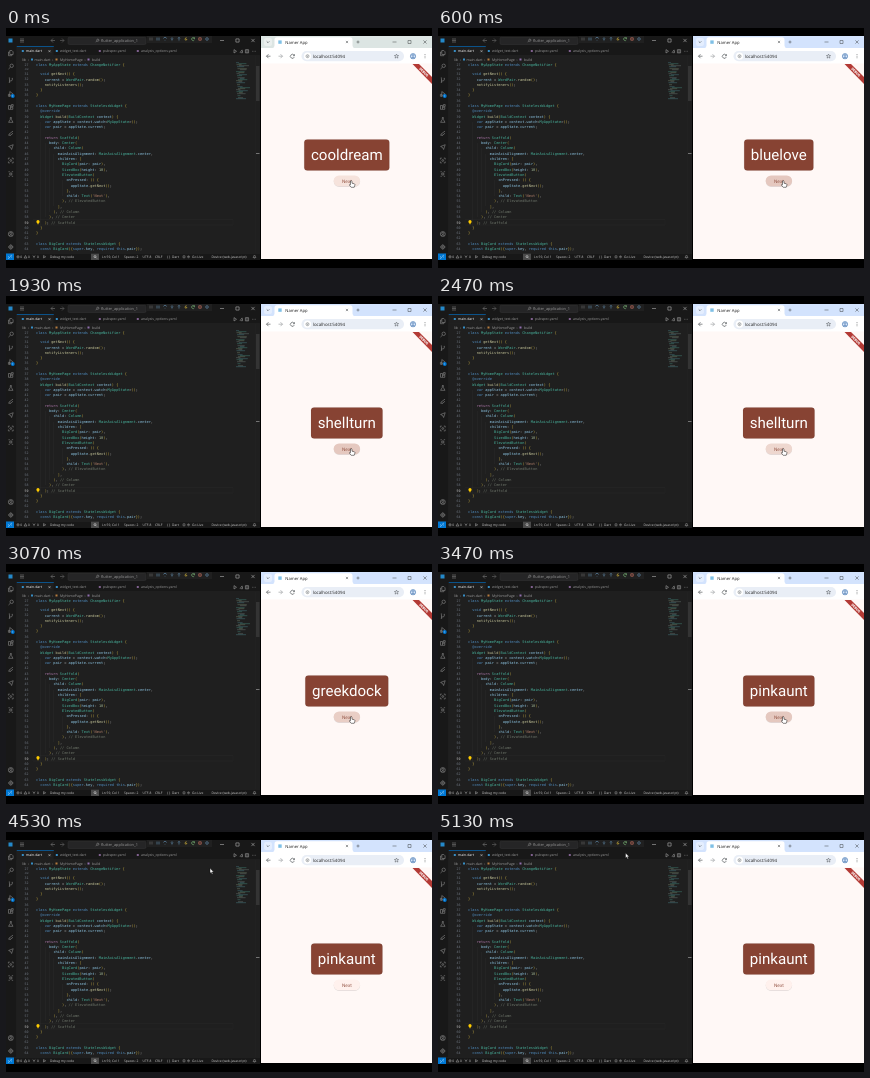
An HTML page that plays this animation: 426x240 px, repeating every 5.19 s.

```html
<!DOCTYPE html>
<html lang="en">
<head>
<meta charset="utf-8">
<title>Namer App demo</title>
<style>
html, body { margin: 0; width: 100%; height: 100%; overflow: hidden; background: #000; }
svg { display: block; width: 100vw; height: 100vh; }
text { white-space: pre; text-rendering: geometricPrecision; font-family: "Open Sans", sans-serif; }
.code { font-family: "DejaVu Sans Mono", monospace; }
.app { font-family: Roboto, sans-serif; }
</style>
</head>
<body>
<svg id="stage" viewBox="0 0 426 240"></svg>
<script>
const stage = document.getElementById('stage');
const esc = s => s.replace(/&/g, '&amp;').replace(/</g, '&lt;');
const rect = (x, y, w, h, fill, more = '') =>
  `<rect x="${x}" y="${y}" width="${w}" height="${h}" fill="${fill}" ${more}/>`;
// y is the vertical middle of the text
const label = (x, y, s, size, fill, more = '') =>
  `<text x="${x}" y="${y + size * 0.35}" font-size="${size}" fill="${fill}" ${more}>${esc(s)}</text>`;
const icon = (x, y, d, color, width = 0.6) =>
  `<path transform="translate(${x} ${y})" d="${d}" fill="none" stroke="${color}" stroke-width="${width}"/>`;
const ring = r => `M${-r} 0a${r} ${r} 0 1 0 ${2 * r} 0a${r} ${r} 0 1 0 ${-2 * r} 0`;
const box = r => `M${-r} ${-r}h${2 * r}v${2 * r}h${-2 * r}z`;
const cross = r => `M${-r} ${-r}L${r} ${r}M${r} ${-r}L${-r} ${r}`;
const back = 'M2 0H-2M0 -2L-2 0L0 2', forward = 'M-2 0H2M0 -2L2 0L0 2', dash = 'M-2 0H2';

const source = `  void getNext() {
    current = WordPair.random();
    notifyListeners();
  }
}

class MyHomePage extends StatelessWidget {
  @override
  Widget build(BuildContext context) {
    var appState = context.watch<MyAppState>();
    var pair = appState.current;

    return Scaffold(
      body: Center(
        child: Column(
          mainAxisAlignment: MainAxisAlignment.center,
          children: [
            BigCard(pair: pair),
            SizedBox(height: 10),
            ElevatedButton(
              onPressed: () {
                appState.getNext();
              },
              child: Text('Next'),
            ), // ElevatedButton
          ],
        ), // Column
      ), // Center
    ); // Scaffold
  }
}

class BigCard extends StatelessWidget {
  const BigCard({super.key, required this.pair});`.split('\n');

const rules = [
  [/^\/\/.*/, '#7c8578'], [/^'[^']*'/, '#ce9178'], [/^return\b/, '#c586c0'],
  [/^(class|extends|void|var|const|super|required|this|@override)(?!\w)/, '#569cd6'],
  [/^[A-Z]\w*/, '#4ec9b0'], [/^[a-z]\w*(?=\()/, '#dcdcaa'], [/^[a-z]\w*/, '#9cdcfe'],
  [/^\d+/, '#b5cea8'], [/^[()\[\]{}]/, '#d7ba45'], [/^[^\w]/, '#cccccc']
];

function codeLine(y, number, text) {
  let spans = '';
  for (let rest = text; rest;) {
    const [rule, color] = rules.find(([r]) => r.test(rest));
    const token = rest.match(rule)[0];
    spans += `<tspan fill="${color}">${esc(token)}</tspan>`;
    rest = rest.slice(token.length);
  }
  return label(22.5, y, String(number), 3.3, number === 59 ? '#ccc' : '#6e7681', 'class="code" text-anchor="end"') +
    `<text class="code" x="30" y="${y + 1.25}" font-size="3.6" opacity=".88">${spans}</text>`;
}

function minimap() {
  const colors = ['#4a7f86', '#44897c', '#75856a', '#6d7974'];
  let out = '';
  for (let i = 0; i < 37; i++) {
    if (i % 9 === 5 || i % 13 === 8) continue;
    const indent = (i * 5 % 9) / 2;
    out += rect(230 + indent, 34.5 + i, 3 + (i * 7 % 11) * 0.7, 0.6, colors[i % 4], 'opacity=".75"');
  }
  return out;
}

function editor() {
  const gray = '#9d9d9d';
  let out = rect(0, 8, 254, 224, '#1f1f1f') + rect(0, 8, 254, 19.5, '#181818') +
    rect(0, 18, 10.5, 207, '#181818') + rect(10.5, 18, 0.3, 207, '#2b2b2b') +
    rect(2.5, 10.5, 4, 4, '#2489ca');
  out += icon(16, 12.5, 'M-2 -1.5H2M-2 0H2M-2 1.5H2', gray, 0.45) +
    icon(47, 12.5, back, '#777') + icon(56, 12.5, forward, '#666') +
    rect(62, 9.3, 78, 7.2, '#252526', 'rx="1.3" stroke="#3c3c3c" stroke-width=".4"') +
    icon(91.5, 12.5, 'M-.7 .5L-1.8 1.7M-.8 -.3a1.1 1.1 0 1 0 2.2 0a1.1 1.1 0 1 0 -2.2 0', gray, 0.5) +
    label(95, 12.7, 'flutter_application_1', 3.9, '#999');
  // Debug toolbar
  out += rect(141, 8, 65, 7, '#202020');
  [['M-1 -1.5V1.5M1 -1.5V1.5', '#777'], ['M-1 -1.5V1.5M1 -1.5V1.5', '#6c9fc4'],
   ['M-1.5 -.5A1.6 1.6 0 0 1 1.6 -.4M0 .9V1.5', '#6c9fc4'], ['M0 -1.7V.6M-1 -.4L0 .6L1 -.4M-.3 1.6H.3', '#6c9fc4'],
   ['M0 1V-1.6M-1 -.6L0 -1.6L1 -.6M-.3 1.6H.3', '#6c9fc4'], ['M.4 -1.8L-1.2 .3H1L-.4 1.8', '#e5c33b'],
   ['M1.4 -.7A1.5 1.5 0 1 0 1.4 .8M1.5 -1.7V-.5H.3', '#89d185'], [box(1.2), '#f48771'], [ring(1.3), '#6c9fc4']
  ].forEach(([d, color], i) => { out += icon(145 + i * 7, 11, d, color, 0.55); });
  out += icon(216, 12.5, dash, '#ccc', 0.5) + icon(231.5, 12.5, box(1.6), '#ccc', 0.5) + icon(247, 12.5, cross(1.6), '#ccc', 0.5);
  // Tabs
  out += rect(10.8, 18.5, 37, 9.5, '#1f1f1f') + rect(10.8, 18.3, 37, 0.6, '#0078d4') +
    rect(10.8, 27.4, 243, 0.3, '#2b2b2b') + rect(11.5, 27.3, 36, 0.5, '#1f1f1f');
  [[20, 'main.dart', '#fff'], [54, 'widget_test.dart', gray], [97, 'pubspec.yaml', gray], [135, 'analysis_options.yaml', gray]]
    .forEach(([x, name, color], i) => {
      out += rect(x - 4.2, 22, 2, 2, i < 2 ? '#378dc4' : '#80618f') + label(x, 23.2, name, 3.5, color);
    });
  out += icon(43.5, 23.2, cross(1), '#ddd', 0.5) + icon(229, 23.3, 'M-1 -1.7L1.5 0L-1 1.7z', gray) +
    icon(235, 23.3, 'M-1 1.5L1 -1.5M-.2 1.4H1.5V-1', gray) + icon(241, 23.3, box(1.6) + 'M0 -1.6V1.6', gray) +
    icon(248, 23.3, 'M-1.6 0h.6M-.3 0h.6M1 0h.6', gray);
  out += label(16, 31.5, 'lib  ›', 3.5, gray) + rect(25, 30.5, 2, 2, '#378dc4') +
    label(28.5, 31.5, 'main.dart  ›', 3.5, gray) + rect(49.5, 30.5, 2, 2, '#b57b3e') +
    label(54, 31.5, 'MyHomePage  ›', 3.5, gray) + rect(81.5, 30.5, 2, 2, '#8f6fae') + label(86, 31.5, 'build', 3.5, gray);
  // Code
  out += codeLine(37.2, 27, 'class MyAppState extends ChangeNotifier {') +
    `<clipPath id="under"><rect x="11" y="40.3" width="216" height="4"/></clipPath><g clip-path="url(#under)">${codeLine(41, 30, '  ')}</g>`;
  out += rect(27, 191.8, 200, 5.2, 'none', 'stroke="#282828" stroke-width=".4"');
  source.forEach((text, i) => { out += codeLine(46 + i * 5.3, 31 + i, text); });
  [[34.5, 94, 200], [39, 115, 189], [43.2, 120, 184], [47.5, 126, 178], [56.3, 152, 168]].forEach(([x, top, end]) => {
    out += rect(x, top, 0.25, end - top, '#363636');
  });
  out += `<circle cx="32" cy="193.7" r="1.6" fill="#ffcc00"/>` + rect(31.4, 195.1, 1.2, 1.1, '#ffcc00') + minimap();
  out += rect(249, 28, 0.3, 197, '#2b2b2b') + rect(250, 38, 3.5, 35, '#343434') + rect(250, 125, 3.5, 0.7, '#9a9a9a');
  // Activity bar
  [[25, 'M-1 -2.5H1L2.3 -1.2V1.5H-1zM-1 -1H-2.3V2.7H1V1.5'],
   [38.5, 'M-.3 .6L-2.3 2.5M-.8 -.7a1.7 1.7 0 1 0 3.4 0a1.7 1.7 0 1 0 -3.4 0'],
   [52, 'M-1.3 -1.5V2M-1.3 1C1.3 1 1.5 .5 1.5 -1M-2 -2h1.3M.9 -1.6h1.3M-2 2.4h1.3'],
   [66, 'M-1 -2.5L2.3 0L-1 2.4zM-2.4 .3h1.5v2h-1.5z'],
   [79, 'M-2.3 -1.5H-.3V2.3H-2.3zM-.3 .3H2V2.3H-.3M.6 -2.4h1.8v1.8H.6z'],
   [92, 'M-.8 -2.4H.8M-.5 -2.4V-.6L-2.2 2.3H2.2L.5 -.6V-2.4'],
   [105.5, 'M2.2 -2.4L-2 .8L-.6 2.2L2.2 -.3M-2.2 2.5L-.8 1'],
   [119, 'M2.4 -2.3L-2.2 -.5L-.2 .5L.8 2.5z'],
   [132.5, 'M-2.4 -1V-2.4H-1M1 -2.4H2.4V-1M2.4 1V2.4H1M-1 2.4H-2.4V1' + ring(0.9)],
   [146, box(1) + 'M-2.3 -2.3h1.3M1 -2.3h1.3M-2.3 2.3h1.3M1 2.3h1.3'],
   [206, ring(2.5) + 'M-1 -.6a1 1 0 1 0 2 0a1 1 0 1 0 -2 0M-1.7 1.8Q0 -.2 1.7 1.8'],
   [219, ring(1.8) + ring(0.7) + 'M0 -2.7V-1.8M0 1.8V2.7M-2.7 0H-1.8M1.8 0H2.7']
  ].forEach(([y, d]) => { out += icon(4.8, y, d, '#8a8a8a', 0.6); });
  out += `<circle cx="6.8" cy="68" r="1.9" fill="#0078d4"/>` + label(6.8, 68, '1', 2.5, '#fff', 'text-anchor="middle"');
  // Status bar
  out += rect(0, 225.5, 254, 6.5, '#181818') + rect(0, 225.3, 254, 0.3, '#2b2b2b') + rect(0, 225.5, 8, 6.5, '#0078d4') +
    icon(4, 228.8, 'M-1.8 -.3L-.5 .8L-1.8 1.8M1.8 -1.7L.5 -.6L1.8 .5', '#fff', 0.5) +
    icon(12, 228.8, ring(1.2) + cross(0.6), '#ccc', 0.35) + label(14.2, 228.8, '0', 3.2, '#ccc') +
    icon(19.5, 228.8, 'M0 -1.3L1.4 1.2H-1.4z', '#ccc', 0.4) + label(22, 228.8, '0', 3.2, '#ccc') +
    icon(28, 228.8, 'M0 1.4V-.4M-1.3 -1.2L0 0L1.3 -1.2', '#ccc', 0.4) + label(31, 228.8, '0', 3.2, '#ccc') +
    icon(38.5, 228.8, 'M-1 -1.2L1.2 0L-1 1.2z', '#ccc', 0.4) +
    rect(85, 225.7, 8, 6.3, '#4a4a4a') + icon(89, 228.6, ring(1) + 'M.8 .8L1.8 1.8', '#eee', 0.5);
  [[44, 'Debug my code'], [96, 'Ln 59, Col 1'], [118, 'Spaces: 2'], [136.5, 'UTF-8'], [149, 'CRLF'], [161, '{ }  Dart'],
   [186, 'Go Live'], [205.5, 'Device (web-javascript)']].forEach(([x, s]) => { out += label(x, 228.8, s, 3.3, '#ccc'); });
  return out + icon(182.5, 228.8, ring(1) + ring(0.3), '#ccc', 0.35) + icon(178, 228.8, box(1), '#ccc', 0.35) +
    icon(248.5, 228.6, 'M-1.4 1H1.4L.9 .2V-.6Q0 -2.4 -.9 -.6V.2zM-.3 1.7H.3', '#ccc', 0.4);
}

function browser() {
  const ink = '#3c4043';
  return rect(255, 8, 171, 14, '#d3e3fd', 'id="strip"') + rect(255, 20, 171, 16, '#fff') +
    rect(258, 10, 8, 8, '#fff', 'rx="2" opacity=".4"') + icon(262, 14, 'M-1.3 -.6L0 .7L1.3 -.6', ink) +
    `<path d="M266 20.2Q268.5 20 268.5 17.5V11.8Q268.5 9.3 271 9.3H344Q346.5 9.3 346.5 11.8V17.5Q346.5 20 349 20.2z" fill="#fff"/>` +
    rect(272.3, 12.4, 3.4, 3.4, '#7fc0e6') + label(279.3, 14.2, 'Namer App', 4.2, '#1f1f1f') +
    icon(341, 14, cross(1.1), ink, 0.5) + icon(352, 14, 'M-1.5 0H1.5M0 -1.5V1.5', ink, 0.5) +
    icon(388.5, 14, dash, ink, 0.5) + icon(403.5, 14, box(1.5), ink, 0.5) + icon(419, 14, cross(1.6), ink, 0.5) +
    icon(262.5, 28.2, back, ink) + icon(274.5, 28.2, forward, '#8f9296') +
    icon(286.5, 28.2, 'M1.7 -.8A2 2 0 1 0 1.8 .8M2 -2V-.5H.5', ink) +
    rect(295.5, 23, 102.5, 10.3, '#e9eef6', 'rx="5.1"') + `<circle cx="301.5" cy="28.2" r="3.6" fill="#fff"/>` +
    icon(301.5, 28.2, ring(1.5) + 'M0 -.2V.9M0 -.9V-.5', ink, 0.4) + label(306.8, 28.4, 'localhost:54094', 4.4, '#1f1f1f') +
    icon(390.5, 28.2, 'M0 -2.1L.7 -.7L2.1 -.6L1 .4L1.4 1.9L0 1L-1.4 1.9L-1 .4L-2.1 -.6L-.7 -.7z', ink, 0.45) +
    `<circle cx="407" cy="28.2" r="3" fill="#d9e7fb"/>` +
    icon(407, 28.2, ring(2.6) + 'M-.9 -.7a.9 .9 0 1 0 1.8 0a.9 .9 0 1 0 -1.8 0M-1.7 1.9Q0 .2 1.7 1.9', '#3d6fa8', 0.6) +
    icon(419, 28.2, 'M0 -2v.7M0 -.35v.7M0 1.3v.7', ink, 0.7) +
    rect(255, 35.5, 171, 195.5, '#fff8f6') +
    `<path d="M406.5 36H413L426 49V56z" fill="#b33a35"/>` +
    `<text class="app" transform="translate(417.8 44.1) rotate(45)" y="1.2" font-size="3.5" font-weight="900" fill="#fff" text-anchor="middle">DEBUG</text>`;
}

stage.innerHTML = rect(0, 0, 426, 240, '#000') + editor() + browser() +
  rect(0, 111.4, 0, 31.1, '#874333', 'id="card" rx="3.2" stroke="#000" stroke-opacity=".1" stroke-width=".6"') +
  `<text id="word" class="app" x="340.8" y="132.3" font-size="15.1" fill="#fff" text-anchor="middle"></text>` +
  rect(327.7, 148, 26.4, 10.9, '#000', 'rx="5.4" opacity=".12"') +
  rect(327.7, 147.5, 26.4, 10.7, '#fff1ed', 'id="button" rx="5.35"') +
  label(340.9, 152.9, 'Next', 4.75, '#97594a', 'class="app" text-anchor="middle"') +
  `<path id="hand" d="M-.5 0Q.4 -.8 1 .2V2.2L3.4 2.8Q4.2 3.1 3.8 4.3L3.2 6.3H.2L-1.7 4Q-1.5 3 -.5 3.6z" fill="#fff" stroke="#111" stroke-width=".5"/>
   <path id="arrow" d="M0 0V5L1.2 4L2 5.9L2.9 5.5L2.1 3.7H3.7z" fill="#fff" stroke="#111" stroke-width=".45"/>`;

const [strip, card, word, button, hand, arrow] =
  ['strip', 'card', 'word', 'button', 'hand', 'arrow'].map(id => document.getElementById(id));
const LOOP = 5190, FOCUS = 270, LEAVE = 3680, ARROW = 3930;
const words = [[0, 'cooldream'], [530, 'bluelove'], [1130, 'cleanhand'], [1870, 'shellturn'], [2800, 'greekdock'], [3400, 'pinkaunt']];
const path = [[LEAVE, 345, 153], [3870, 308.5, 128], [4270, 235, 65], [4670, 187.5, 21]];
const plain = [255, 241, 237], hovered = [246, 227, 220], focused = [238, 215, 207], pressed = [229, 200, 191];
const clamp = v => Math.max(0, Math.min(1, v));
const mix = (a, b, k) => a.map((v, i) => v + (b[i] - v) * k);

function pointer(t) {
  const last = path[path.length - 1];
  if (t >= last[0]) return last.slice(1);
  const i = Math.max(1, path.findIndex(p => p[0] > t));
  const [a, b] = [path[i - 1], path[i]];
  return mix(a.slice(1), b.slice(1), clamp((t - a[0]) / (b[0] - a[0])));
}

function draw(now) {
  const t = now % LOOP;
  const [start, name] = words.filter(w => w[0] <= t).pop();
  if (word.textContent !== name) {
    word.textContent = name;
    const width = word.getComputedTextLength() + 13.4;
    card.setAttribute('x', 340.8 - width / 2);
    card.setAttribute('width', width);
  }
  strip.setAttribute('fill', t < FOCUS ? '#dce5e3' : '#d3e3fd');
  const hover = 1 - clamp((t - ARROW) / 250);
  const press = 1 - clamp((t - start - 150) / 300);
  const held = start ? mix(focused, pressed, press) : hovered;
  button.setAttribute('fill', `rgb(${mix(plain, held, hover).map(Math.round)})`);
  const place = `translate(${pointer(t)})`;
  for (const [shape, shown] of [[hand, t < ARROW], [arrow, t >= ARROW]]) {
    shape.style.display = shown ? '' : 'none';
    shape.setAttribute('transform', place);
  }
  requestAnimationFrame(() => draw(performance.now() - origin));
}
const origin = performance.now();
draw(0);
</script>
</body>
</html>
```
